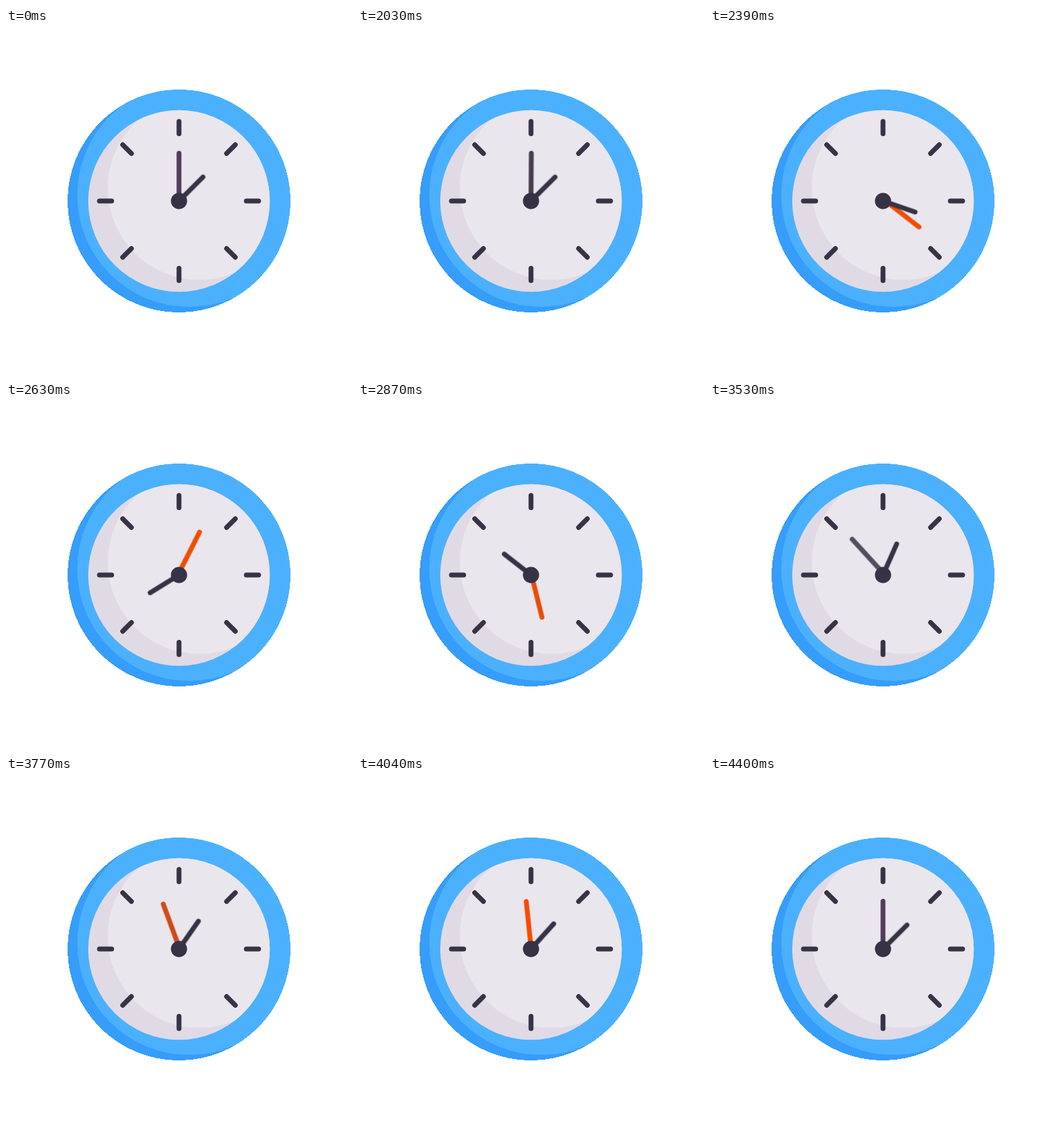
An HTML page for the animation above (4.49 s loop, 500 by 500 pixels).

```html
<!DOCTYPE html>
<html lang="en">
<head>
<meta charset="utf-8">
<title>Clock</title>
<style>
  html, body {
    margin: 0;
    width: 100%;
    height: 100%;
    overflow: hidden;
    background: #fff;
  }
  svg {
    display: block;
    width: 100vw;
    height: 100vh;
  }
  .line {
    fill: none;
    stroke: #373346;
    stroke-width: 7;
    stroke-linecap: round;
  }
  .hour, .minute {
    animation: 4490ms linear infinite;
  }
  .hour {
    transform-origin: 250px 250px;
    animation-name: hour;
  }
  .minute {
    transform-origin: 250px 247px;
    animation-name: minute, tint;
  }
  /* rest for 2000 ms, sweep for 2400 ms, rest again */
  @keyframes hour {
    0% { transform: rotate(45deg); }
    44.543% { transform: rotate(45deg); animation-timing-function: cubic-bezier(.333, 0, 0, 1); }
    97.996%, 100% { transform: rotate(405deg); }
  }
  @keyframes minute {
    0% { transform: rotate(0deg); }
    44.543% { transform: rotate(0deg); animation-timing-function: cubic-bezier(.333, 0, 0, 1); }
    97.996%, 100% { transform: rotate(720deg); }
  }
  @keyframes tint {
    0%, 45.1% { stroke: #523c5c; }
    45.2% { stroke: #463f51; }
    51.2%, 61.9% { stroke: #f04e00; }
    63.92% { stroke: #e84b0a; }
    73.5%, 78.7% { stroke: #564c5f; }
    85.7%, 91.3% { stroke: #f54b00; }
    97.9%, 100% { stroke: #523c5c; }
  }
</style>
</head>
<body>
<svg viewBox="0 0 500 500">
  <defs>
    <clipPath id="rim"><circle cx="250" cy="250" r="161"/></clipPath>
    <clipPath id="face"><circle cx="250" cy="250" r="131.2"/></clipPath>
    <path id="tick" d="M250 135V152.7"/>
  </defs>

  <circle cx="250" cy="250" r="161" fill="#369dfb" shape-rendering="crispEdges"/>
  <circle cx="264.7" cy="241.3" r="161.7" fill="#4bb1ff" clip-path="url(#rim)"/>
  <circle cx="250" cy="250" r="131.2" fill="#e0dae4"/>
  <circle cx="279.5" cy="231.5" r="132.5" fill="#eae6ed" clip-path="url(#face)"/>

  <g class="line">
    <use href="#tick"/>
    <use href="#tick" transform="rotate(45 250 250)"/>
    <use href="#tick" transform="rotate(90 250 250)"/>
    <use href="#tick" transform="rotate(135 250 250)"/>
    <use href="#tick" transform="rotate(180 250 250)"/>
    <use href="#tick" transform="rotate(225 250 250)"/>
    <use href="#tick" transform="rotate(270 250 250)"/>
    <use href="#tick" transform="rotate(315 250 250)"/>
  </g>

  <path class="line minute" d="M250 247V181"/>
  <path class="line hour" d="M250 250V201"/>
  <circle cx="250" cy="250" r="11.7" fill="#373346"/>
</svg>
</body>
</html>
```
